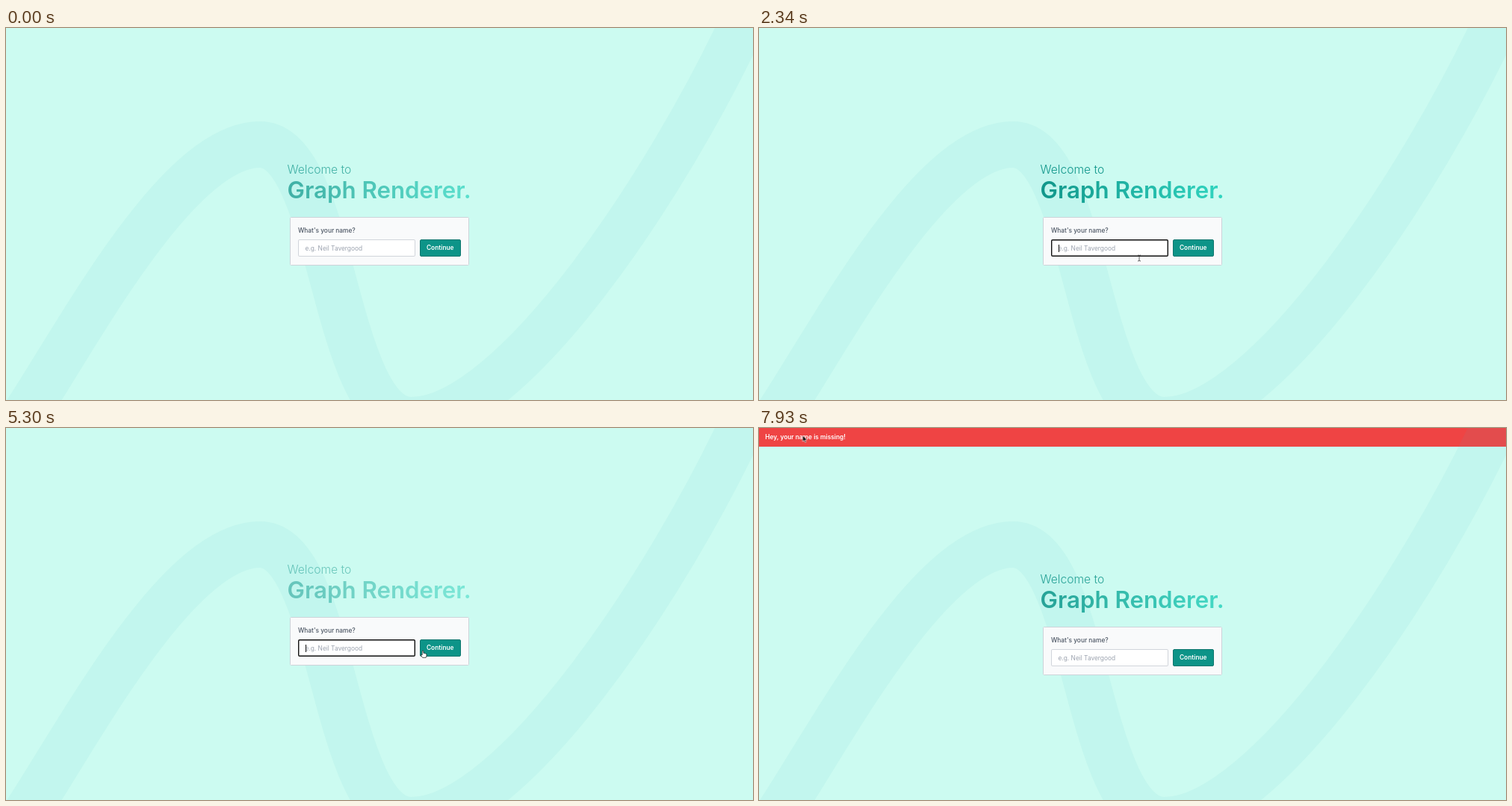
Animation of 1000 by 498 pixels, one loop 8 s. Source, as an HTML page:

```html
<!DOCTYPE html>
<html lang="en">
<head>
<meta charset="utf-8">
<title>Graph Renderer</title>
<style>
  html, body { margin: 0; width: 100%; height: 100%; overflow: hidden; }
  body {
    position: relative;
    background: #ccfbf1;
    font: 8.333px/12px Inter, sans-serif;
    font-optical-sizing: none;
    white-space: pre;
  }
  body *, .field::before { box-sizing: border-box; }
  div, svg, h1, p { position: absolute; margin: 0; }

  /* Every animation shares one 8 s clock */
  .banner, .form, .field, .empty, .name, .caret, .arrow, .beam, .hand {
    animation: 8s step-end infinite;
  }

  .banner {
    left: 0; top: 0; width: 1000px; height: 25px;
    padding-left: 8.3px;
    background: #ef4444; color: #fff;
    font-weight: 600; line-height: 25px;
    animation-name: banner;
  }
  .wave { left: 0; top: 0; }

  .form { left: 0; top: 0; animation-name: drop; }
  .title { left: 376.5px; top: 0; color: #0d9488; animation: pulse 8s infinite; }
  .title p { top: 180px; font-size: 15.625px; font-weight: 300; line-height: 20px; }
  .title h1 {
    top: 197.3px;
    font-size: 31.25px; font-weight: 600; line-height: 40px;
    background: linear-gradient(90deg, #0d9488, #2dd4bf);
    -webkit-background-clip: text; background-clip: text;
    color: transparent;
  }
  .card {
    left: 380px; top: 253px; width: 240px; height: 65px;
    background: #f9fafb; border: 1px solid #cdd3d9; border-radius: 1.5px;
  }
  .label { left: 391px; top: 265px; color: #4b5563; font-weight: 500; }
  .field {
    left: 391px; top: 283px; width: 156.5px; height: 23px;
    background: #fff; border-radius: 2px;
    box-shadow: inset 0 0 0 1px #d1d5db;
    animation-name: focus;
  }
  .empty, .name { left: 9.5px; top: 6px; }
  .empty { color: #9ca3af; animation-name: empty; }
  .name { color: #111; animation-name: name; }
  .caret {
    display: inline-block; width: .8px; height: 10px; margin-right: -.8px;
    background: #111; vertical-align: -2px;
    animation-name: blink;
  }
  .name .caret { animation-name: blink-name; }
  .button {
    left: 553.5px; top: 283px; width: 55.5px; height: 23px;
    background: #0d9488; border: 1px solid #0f766e; border-radius: 2px;
    color: #fff; font-weight: 600; line-height: 21.5px; text-align: center;
  }

  .cursor { left: 0; top: 0; overflow: visible; animation: move 8s ease-in-out infinite; }
  .arrow { animation-name: arrow; }
  .beam { animation-name: beam; }
  .hand { animation-name: hand; }

  @keyframes pulse {
    0% { opacity: .71; animation-timing-function: cubic-bezier(.3, .5, .65, 1); }
    6.875%, 31%, 55.125%, 79.25% { opacity: 1; animation-timing-function: cubic-bezier(.4, 0, .6, 1); }
    18.9375%, 43.0625%, 67.1875% { opacity: .5; animation-timing-function: cubic-bezier(.4, 0, .6, 1); }
    91.3125% { opacity: .5; animation-timing-function: cubic-bezier(.45, 0, .7, .6); }
    100% { opacity: .915; }
  }
  @keyframes banner { 0% { opacity: 0; } 70%, 100% { opacity: 1; } }
  @keyframes drop { 0% { top: 0; } 70%, 100% { top: 12.5px; } }
  @keyframes focus {
    0%, 70%, 100% { background: #fff; box-shadow: inset 0 0 0 1px #d1d5db; }
    23.75%, 62.5% { background: #fff; box-shadow: inset 0 0 0 1.4px #101010; }
    46.875% { background: #e8f0fe; box-shadow: inset 0 0 0 1.4px #101010; }
  }
  @keyframes empty { 0%, 62.5%, 100% { opacity: 1; } 46.875% { opacity: 0; } }
  @keyframes name { 0%, 62.5%, 100% { opacity: 0; } 46.875% { opacity: 1; } }
  @keyframes blink {
    0%, 30%, 42.5%, 68.75%, 100% { opacity: 0; }
    23.75%, 36.25%, 62.5% { opacity: 1; }
  }
  @keyframes blink-name { 0%, 59.375% { opacity: 1; } 53.125% { opacity: 0; } }

  @keyframes move {
    0%, 11.125% { transform: translate(612px, 236px); }
    12.25% { transform: translate(600px, 244px); }
    20% { transform: translate(530px, 292px); }
    23.75% { transform: translate(516px, 300px); }
    29.25%, 30.5% { transform: translate(509px, 308px); }
    37.5%, 53% { transform: translate(526.7px, 319.3px); }
    62.5%, 70% { transform: translate(558px, 298px); }
    80%, 85% { transform: translate(64.5px, 20px); }
    93.75%, 100% { transform: translate(58.5px, 10px); }
  }
  @keyframes arrow {
    0%, 18%, 61.5% { opacity: 0; }
    11.125%, 30.5%, 71%, 100% { opacity: 1; }
  }
  @keyframes beam { 0%, 30.5%, 100% { opacity: 0; } 18% { opacity: 1; } }
  @keyframes hand { 0%, 71%, 100% { opacity: 0; } 61.5% { opacity: 1; } }
</style>
</head>
<body>
  <div class="banner">Hey, your name is missing!</div>

  <svg class="wave" width="1000" height="498" fill="none">
    <path stroke="rgb(75 180 195 / .07)" stroke-width="62"
      d="M0 558L38 498C110 385 235 156 340 156C440 156 436 525 542 525C680 525 890 200 986 -6L1010 -58"/>
  </svg>

  <div class="form">
    <div class="title"><p>Welcome to</p><h1>Graph Renderer.</h1></div>
    <div class="card"></div>
    <div class="label">What's your name?</div>
    <div class="field">
      <div class="empty"><span class="caret"></span>e.g. Neil Tavergood</div>
      <div class="name">Dilunatha<span class="caret"></span></div>
    </div>
    <div class="button">Continue</div>
  </div>

  <svg class="cursor" width="1" height="1">
    <path class="arrow" fill="#111" stroke="#fff" stroke-width=".6"
      d="M0 0V8.2L1.9 6.5L3.2 9.4L4.5 8.8L3.2 6H5.8Z"/>
    <path class="beam" fill="none" stroke="#333" stroke-width=".8"
      d="M-2 -4Q0 -4 0 -3Q0 -4 2 -4M0 -3V3M-2 4Q0 4 0 3Q0 4 2 4"/>
    <path class="hand" fill="#fff" stroke="#111" stroke-width=".7" stroke-linejoin="round"
      d="M-.9 6V.6Q0 -.6 .9 .6V3.4Q2 2.9 2.5 3.8Q3.6 3.4 4 4.3Q5 4.2 5 5.2V7L4.2 9.4H-.4L-2.8 6Q-2.6 4.8 -.9 6Z"/>
  </svg>
</body>
</html>
```
